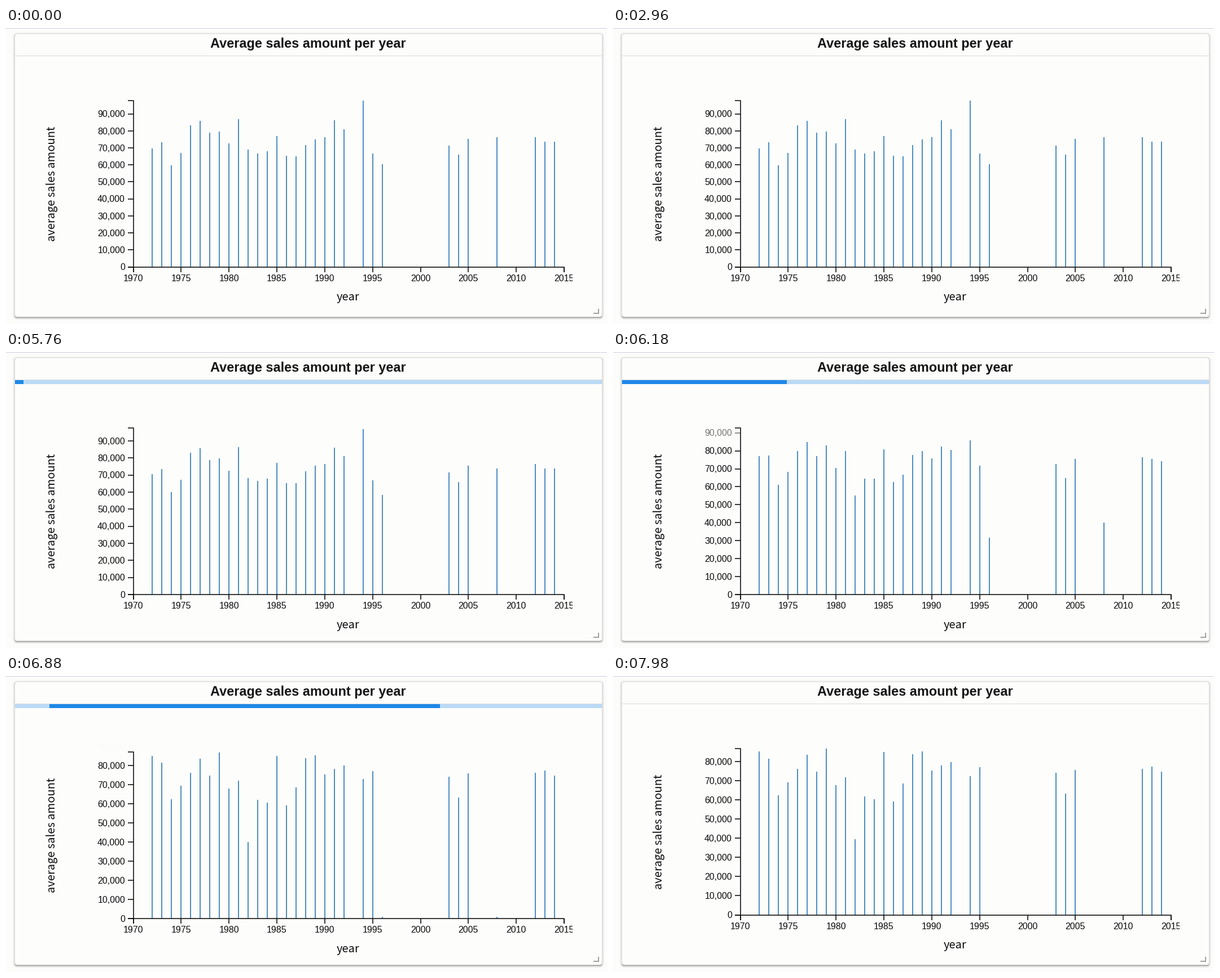
A matplotlib script that plays this animation: 1065x526 px, repeating every 8 s.

```python
import matplotlib.pyplot as plt
import numpy as np
from matplotlib.animation import FuncAnimation
from matplotlib.collections import LineCollection
from matplotlib.patches import FancyBboxPatch, Rectangle
from matplotlib.transforms import Affine2D

W, H, DPI = 1065, 526, 100
STEP, LOOP = 20, 8000
PT = 72 / DPI

CARD_X, CARD_Y, CARD_W, CARD_H = 16, 11, 1040, 502.5
CARD, PAGE, INK = "#fdfdfc", "#fcfcfb", "#0b0b0b"
AXIS_X, BASE, TOP = 225.5, 424.5, 128.5
YEAR_W = (989 - AXIS_X) / 45
MAX_OLD, MAX_NEW = 98000, 86900
PROGRESS_H = 6.5

YEARS = np.array([*range(1972, 1993), 1994, 1995, 1996,
                  2003, 2004, 2005, 2008, 2012, 2013, 2014])
# Bar heights in pixels before and after the update
OLD = BASE - np.array([
    213.5, 203, 243.5, 221.5, 173, 165, 185.5, 184, 204.5, 162, 215.5,
    223, 218.5, 192, 226.5, 228, 207.5, 198, 193.5, 163.5, 179.5, 128.5,
    223, 242, 209, 224.5, 196.5, 193.5, 193.5, 201.5, 201.5])
NEW = BASE - np.array([
    134, 146.5, 212, 188.5, 165, 140, 170, 129, 193.5, 179.5, 289.5,
    213.5, 218.5, 135, 223, 190.5, 138.5, 134, 168, 158.5, 152.5, 177.5,
    162, BASE, 171.5, 209, 166.5, BASE, 165, 160.5, 170])

# The page renders unevenly while busy: drawn step -> ms since loading began
BUSY_STEPS = [124, 125, 140, 149, 157]
BUSY_MS = [10, 33, 384, 517, 635]
CHART_LEAD, CHART_MS, SWEEP_MS = 117, 750, 1320

s = np.linspace(0, 1, 400)
EASE_X = 0.75 * s * (1 - s) + s ** 3
EASE_Y = 0.3 * s * (1 - s) ** 2 + 3 * s ** 2 * (1 - s) + s ** 3


def css_ease(t):
    return np.interp(t, EASE_X, EASE_Y)


def cubic_in_out(t):
    t = min(max(t, 0), 1)
    return 4 * t ** 3 if t < 0.5 else 1 - 4 * (1 - t) ** 3


def lerp(a, b, p):
    return a + (b - a) * p


fig = plt.figure(figsize=(W / DPI, H / DPI), dpi=DPI, facecolor=PAGE)
ax = fig.add_axes([0, 0, 1, 1])
ax.set_xlim(0, W)
ax.set_ylim(H, 0)
ax.axis("off")

shift = Affine2D()
chart = shift + ax.transData


def rect(x, y, w, h, color, z=1):
    patch = Rectangle((x, y), w, h, fc=color, lw=0, zorder=z)
    ax.add_patch(patch)
    return patch


def card(grow, dy, color, alpha=1.0):
    ax.add_patch(FancyBboxPatch(
        (CARD_X - grow, CARD_Y - grow + dy),
        CARD_W + 2 * grow, CARD_H + 2 * grow,
        boxstyle=f"round,pad=0,rounding_size={4 + grow}",
        fc=color, alpha=alpha, lw=0, zorder=0))


def label(x, y, text, px, family="Liberation Sans", ha="center",
          trans=chart, color=INK, **kw):
    return ax.text(x, y, text, fontsize=px * PT, family=family, ha=ha,
                   va="baseline", color=color, transform=trans, zorder=4, **kw)


def lines(segments, color, width, z):
    group = LineCollection(segments, colors=color, linewidths=width * PT,
                           capstyle="butt", transform=chart, zorder=z)
    ax.add_collection(group, autolim=False)
    return group


# Page and card
rect(0, 0, W, 1, "#cfcde4")
for grow in (4, 3, 2, 1):
    card(grow, 1, "black", 0.035)
card(0, 2, "black", 0.14)
card(0, 1, "black", 0.2)
card(0, 0, CARD)
rect(CARD_X, 49, CARD_W, 1, "#d9d9d8")
rect(1041, 505.5, 10, 2.5, "#a0a0a0")
rect(1048.5, 499, 2.5, 9, "#a0a0a0")
label(535.5, 35, "Average sales amount per year", 23.5, trans=ax.transData,
      color="#161616", weight="bold")

# Loading bar
track = rect(CARD_X, 50, CARD_W, 6.5, "#bbdaf6", 2)
sweep = rect(CARD_X, 50, 0, 6.5, "#1e88e8", 3)

# Chart
bars = lines([], "#2573b3", 1.6, 2)
right = AXIS_X + 45 * YEAR_W
axes_lines = [
    [(AXIS_X - 10, TOP), (AXIS_X, TOP), (AXIS_X, BASE), (AXIS_X - 10, BASE)],
    [(AXIS_X, BASE + 9), (AXIS_X, BASE), (right, BASE), (right, BASE + 9)],
]
for year in range(1970, 2016, 5):
    x = AXIS_X + (year - 1970) * YEAR_W
    axes_lines.append([(x, BASE), (x, BASE + 9)])
    label(x, BASE + 25, str(year), 16)
lines(axes_lines, INK, 1.6, 3)
rect(1004, 434, 20, 26, CARD, 5)

label(606.5, BASE + 59.5, "year", 20.1, "Noto Sans CJK JP")
label(87, 276.5, "average sales amount", 20.1, "Noto Sans CJK JP",
      rotation=90, rotation_mode="anchor")

VALUES = np.arange(0, 90001, 10000)
ticks = lines([], INK, 1.6, 3)
tick_labels = [label(211, BASE, f"{v:,}", 16, ha="right") for v in VALUES]


def drawn_step(t):
    """Steps are shown for 20, 20 and 100 ms in turn."""
    block, rest = divmod(t + 20, 140)
    return 3 * block + min(rest // 20, 2)


def draw_loading(busy, ms):
    track.set_visible(busy)
    sweep.set_visible(busy)
    shift.clear().translate(0, PROGRESS_H if busy else 0)
    p = css_ease(ms / SWEEP_MS)
    left = min(max(lerp(-2, 1.07, p), 0), 1)
    end = min(max(lerp(0, 1.08, p), 0), 1)
    sweep.set_x(CARD_X + left * CARD_W)
    sweep.set_width((end - left) * CARD_W)


def draw_chart(p):
    xs = AXIS_X + (YEARS - 1970) * YEAR_W
    heights = lerp(OLD, NEW, p)
    bars.set_segments([[(x, BASE), (x, BASE - h)]
                       for x, h in zip(xs, heights) if h > 0.3])

    span = BASE - TOP
    ys = BASE - VALUES * lerp(span / MAX_OLD, span / MAX_NEW, p)
    ticks.set_segments([[(AXIS_X - 10, y), (AXIS_X, y)] for y in ys])
    alphas = np.ones(len(VALUES))
    alphas[-1] = 1 - p
    ticks.set_alpha(alphas)
    for text, y, alpha in zip(tick_labels, ys, alphas):
        text.set_y(y + 5.7)
        text.set_alpha(alpha)
    tick_labels[-1].set_visible(p < 1)


def update(i):
    step = drawn_step(i * STEP)
    ms = np.interp(step, BUSY_STEPS, BUSY_MS)
    draw_loading(BUSY_STEPS[0] <= step < BUSY_STEPS[-1], ms)
    started = step >= BUSY_STEPS[0]
    draw_chart(cubic_in_out((ms + CHART_LEAD) / CHART_MS) if started else 0)
    return []


anim = FuncAnimation(fig, update, frames=LOOP // STEP, interval=STEP,
                     init_func=lambda: update(0), repeat=True, repeat_delay=0)
plt.show()
```
